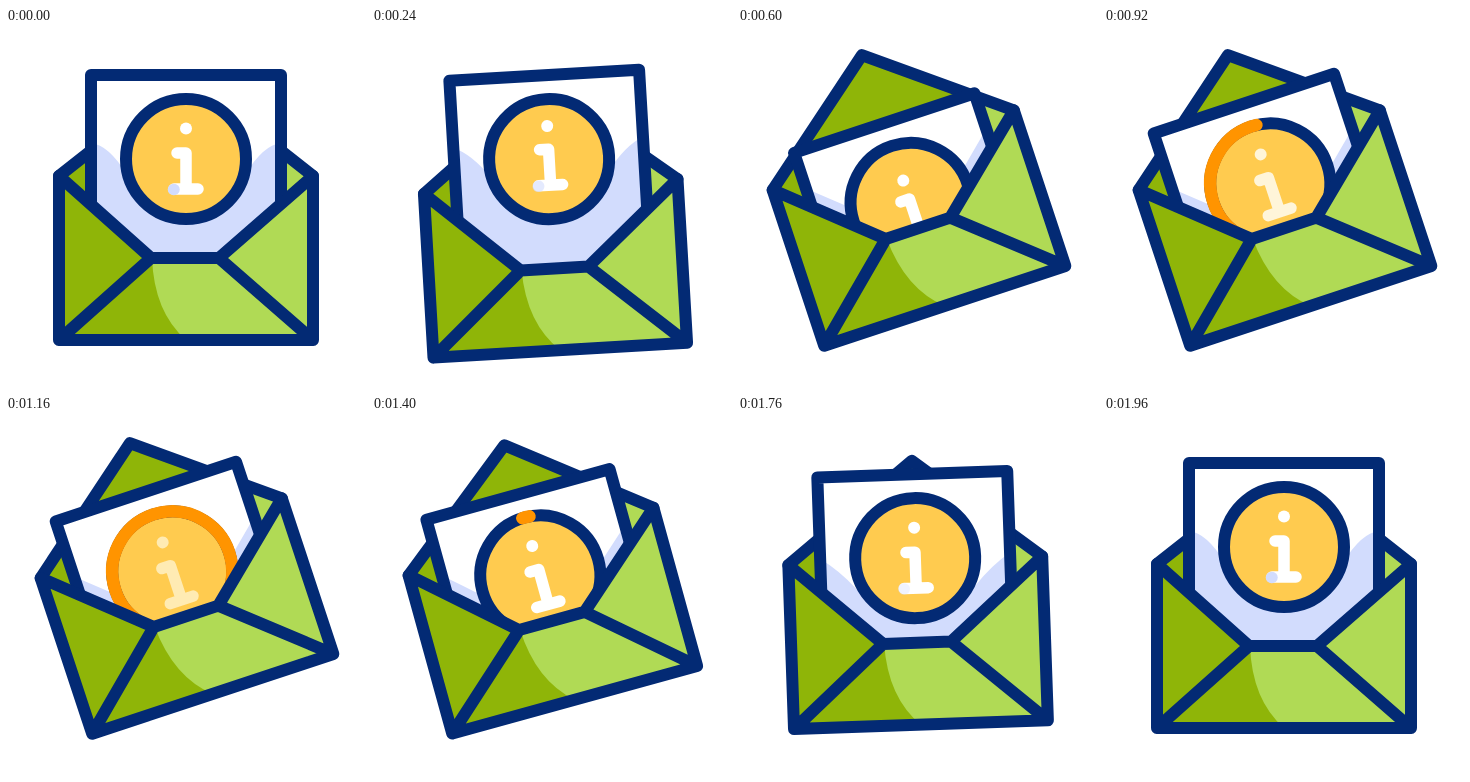
These frames come from a looping animation (360 px wide and 360 px high, 2000 ms). An HTML page:

```html
<!DOCTYPE html>
<html>
<head>
<meta charset="utf-8">
<style>
html, body { margin: 0; width: 100%; height: 100%; overflow: hidden; background: #fff; }
svg { display: block; width: 100%; height: 100%; }
.line { fill: none; stroke: #032a74; stroke-width: 12; stroke-linejoin: round; stroke-linecap: round; }
.dark { fill: #8fb508; }
.light { fill: #b0da55; }
</style>
</head>
<body>
<svg viewBox="0 0 360 360">
  <g id="all">
    <path class="dark" d="M53 148 180 48 307 148V230H53Z"/>
    <path class="light" d="M268 117 307 148V230H268Z"/>
    <path class="line" d="M53 148 180 48 307 148"/>
    <path id="sheet" fill="#fff"/>
    <path id="shade" fill="#d2dcfd"/>
    <path id="edge" class="line"/>
    <g id="badge">
      <circle class="line" cx="180" cy="131" r="60" style="fill:#ffcb4f"/>
      <path id="ring" class="line" pathLength="100" transform="rotate(5 180 131)"
        style="stroke:#ff9400;stroke-width:12.5"
        d="M180 71A60 60 0 0 0 180 191A60 60 0 0 0 180 71"/>
      <circle id="dot" cx="180" cy="100.5" r="6"/>
      <g id="stem" fill="none" stroke-width="11.5" stroke-linecap="round" stroke-linejoin="round">
        <path id="letter" d="M171 125H180V161M168 161H192"/>
        <path id="foot" stroke="#d2dcfd" d="M167.5 161.5H168"/>
      </g>
    </g>
    <path class="dark" d="M53 148 145 230 213 230 307 312H53Z"/>
    <path class="light" d="M307 148 213 230H146Q148 284 180 312H307Z"/>
    <path class="line" d="M53 148V312H307V148L213 230H145ZM53 312 145 230M307 312 213 230"/>
  </g>
</svg>
<script>
const $ = id => document.getElementById(id);
const set = (id, name, value) => $(id).setAttribute(name, value);
const shift = (id, y) => set(id, 'transform', `translate(0 ${y})`);

function draw(now) {
  const t = Math.floor(now % 2000 / 40) * 40;
  // Eased progress from 0 to 1 between two times.
  const ramp = (from, to) => {
    const u = Math.min(1, Math.max(0, (t - from) / (to - from)));
    return u * u * (3 - 2 * u);
  };

  // The envelope sinks, then lifts while it tilts, and finally comes back.
  const back = ramp(1235, 1895);
  const angle = -18.3 * (ramp(120, 560) - back);
  const x = 7 * ramp(120, 360) - 6 * ramp(360, 560) - back;
  const y = 16 * ramp(120, 320) - 46 * ramp(320, 560) + 30 * back;
  set('all', 'transform', `translate(${180 + x} ${230 + y}) rotate(${angle}) translate(-180 -230)`);

  // The sheet jumps up, drops below its resting depth and settles.
  const rise = ramp(120, 400), drop = ramp(400, 600), settle = ramp(600, 760);
  const paper = -26.5 * rise + 99 * drop - 20.5 * settle - 52 * ramp(1400, 1950);
  const sheet = `M85 300V${47 + paper}H275V300`;
  set('sheet', 'd', sheet);
  set('edge', 'd', sheet);
  shift('badge', paper);
  shift('stem', -10 * rise + 12 * drop - 2 * settle);
  shift('dot', -7 * rise + 14 * drop - 7 * settle);

  // The shadow has rounded shoulders only at rest.
  const close = ramp(1640, 1950);
  const bulge = 1 - rise + close;
  const top = 115 - 29 * rise + 71 * drop - 42 * close;
  const bend = top + 16 - 14 * bulge;
  set('shade', 'd', `M85 300V${top}Q103 ${bend} 121 ${top + 32}L147 ${top + 55}H213L239 ${top + 32}Q257 ${bend} 275 ${top}V300Z`);
  set('foot', 'opacity', bulge);

  const glow = ramp(660, 1180) - ramp(1180, 1420);
  set('ring', 'stroke-dasharray', `${glow * 100} 200`);
  set('ring', 'visibility', glow > 0 ? 'visible' : 'hidden');
  const tint = `rgb(255 ${255 - 20 * glow} ${255 - 76 * glow})`;
  set('letter', 'stroke', tint);
  set('dot', 'fill', tint);
}

const start = performance.now();
(function frame() {
  draw(performance.now() - start);
  requestAnimationFrame(frame);
})();
</script>
</body>
</html>
```
